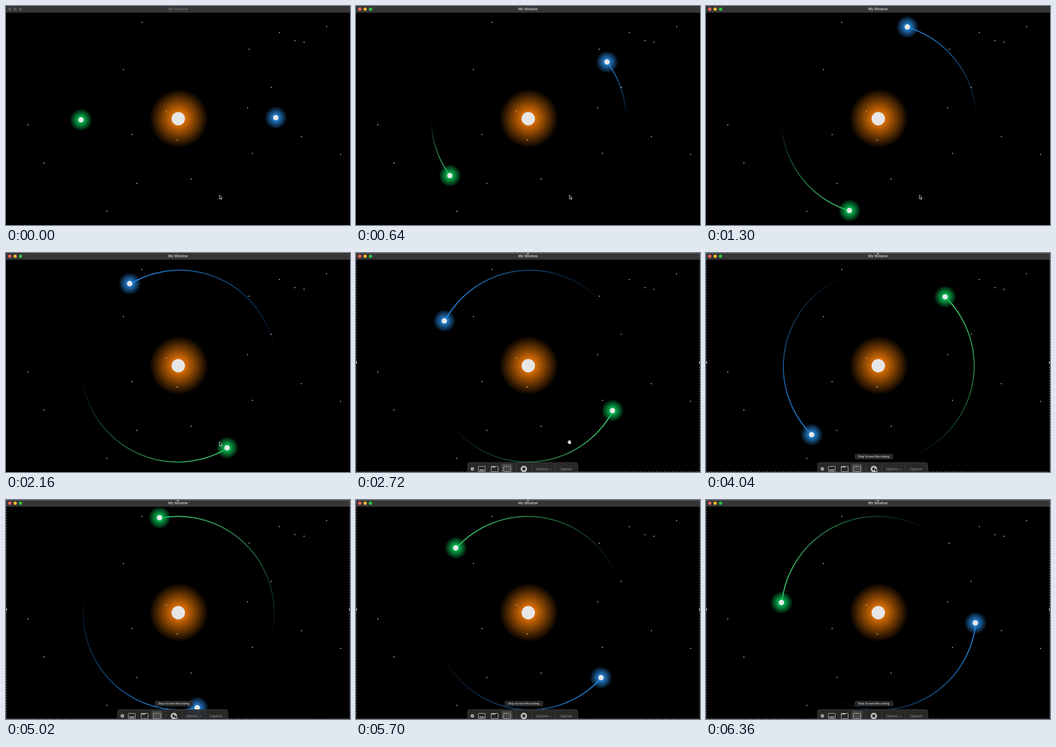
These frames come from a looping animation (640 by 408 pixels, 6.38 s). An HTML page with a canvas:

```html
<!DOCTYPE html>
<html lang="en">
<head>
<meta charset="utf-8">
<title>Two planets</title>
<style>
  html, body { margin: 0; width: 100%; height: 100%; overflow: hidden; background: #000; }
  canvas { display: block; }
</style>
</head>
<body>
<canvas id="stage" width="640" height="408"></canvas>
<script>
const ctx = document.getElementById('stage').getContext('2d');
const LOOP = 6380, FOCUS_AT = 200, TOOLBAR_AT = 2400, TIP_AT = 3600, CURSOR_OFF = 5500;
const ORBIT = { x: 322.3, y: 210.5, r: 179.4 };
const MID = { x: 320.4, y: 209.75 };
const TRAIL = 116;                      // longest trail, in degrees
const TRAIL_SHIFT = 1;                  // trails run slightly right of and below the planets
const BLUE = '38,136,222', GREEN = '8,196,86';
const ANGLES = [[0, .83], [1300, 73.1], [2160, 121], [2720, 151.9],
                [4040, 225.3], [5020, 280.6], [6380, 355.2]];
const STARS = [[252, 30], [596, 38], [508, 49], [537, 64], [554, 67], [452, 80], [218, 118],
               [493, 151], [449, 189], [298, 195], [40, 221], [234, 239], [549, 243], [318, 249],
               [458, 274], [622, 276], [70, 292], [344, 322], [243, 330], [187, 382]];

function circle(x, y, r, fill) {
  ctx.fillStyle = fill;
  ctx.beginPath();
  ctx.arc(x, y, r, 0, 7);
  ctx.fill();
}

function box(x, y, w, h, r, fill, stroke) {
  ctx.beginPath();
  ctx.roundRect(x, y, w, h, r);
  if (fill) { ctx.fillStyle = fill; ctx.fill(); }
  if (stroke) { ctx.strokeStyle = stroke; ctx.lineWidth = 1; ctx.stroke(); }
}

function label(text, x, y, size, weight, fill, align = 'center') {
  ctx.font = `${weight} ${size}px Inter, "Open Sans", sans-serif`;
  ctx.textAlign = align;
  ctx.textBaseline = 'middle';
  ctx.fillStyle = fill;
  ctx.fillText(text, x, y);
}

function line(points, stroke, width = 1) {
  ctx.beginPath();
  points.forEach(([x, y]) => ctx.lineTo(x, y));
  ctx.strokeStyle = stroke;
  ctx.lineWidth = width;
  ctx.stroke();
}

function star(x, y, fill) {
  ctx.fillStyle = fill;
  ctx.fillRect(x - .3, y - .3, 1.6, 1.6);
}

function glow(x, y, r, rgb, edge) {
  const g = ctx.createRadialGradient(x, y, 0, x, y, r);
  g.addColorStop(0, `rgba(${rgb},1)`);
  g.addColorStop(.25, `rgba(${rgb},.92)`);
  g.addColorStop(1, `rgba(${rgb},${edge})`);
  circle(x, y, r, g);
}

function angleAt(t) {
  const i = ANGLES.findIndex(([end]) => end > t);
  const [t0, a0] = ANGLES[i - 1], [t1, a1] = ANGLES[i];
  return a0 + (a1 - a0) * (t - t0) / (t1 - t0);
}

// The green planet mirrors the blue one through the middle.
function place(deg, mirror) {
  const a = deg * Math.PI / 180;
  const x = ORBIT.x + ORBIT.r * Math.cos(a), y = ORBIT.y - ORBIT.r * Math.sin(a);
  return mirror ? [2 * MID.x - x, 2 * MID.y - y] : [x, y];
}

function trail(head, mirror, rgb) {
  const tail = Math.max(ANGLES[0][1], head - TRAIL), n = 80;
  const at = k => place(tail + (head - tail) * k / n, mirror).map(v => v + TRAIL_SHIFT);
  for (let i = 0; i < n; i++) line([at(i), at(i + 1)], `rgba(${rgb},${i / n})`, 2);
}

function planet(head, mirror, rgb) {
  const [x, y] = place(head, mirror);
  glow(x + .5, y + .3, 20, rgb, .08);
  circle(x + .3, y + .3, 5, '#e6e8e8');
}

function titleBar(active) {
  ctx.fillStyle = '#373637';
  ctx.fillRect(0, 0, 640, 12.5);
  const lights = active ? ['#fe5f57', '#febc2e', '#28c840'] : ['#555', '#555', '#555'];
  lights.forEach((c, i) => circle(7 + 10 * i, 6, 3, c));
  label('My Window', 320, 6.2, 6.3, 600, active ? '#c8c8c8' : '#6c6c6c');
}

function selection() {
  ctx.setLineDash([2.5, 2.5]);
  ctx.strokeStyle = '#777';
  ctx.lineWidth = 1;
  ctx.strokeRect(.5, .5, 639, 407);
  ctx.setLineDash([]);
  [[320, 0], [0, 204], [640, 204]].forEach(([x, y]) => circle(x, y, 2.2, '#aaa'));
}

function toolbar() {
  const ink = '#b4b4b4';
  box(207.5, 390.5, 205, 30, 4, 'rgba(46,46,47,.88)', '#3c3c3c');
  circle(216.5, 402.3, 3.2, ink);
  line([[215.3, 401.1], [217.7, 403.5]], '#2a2a2a', .8);
  line([[217.7, 401.1], [215.3, 403.5]], '#2a2a2a', .8);
  box(227.5, 397.5, 13, 10, 1, null, ink);
  box(229.5, 403.5, 9, 2, 0, ink);
  box(251.5, 397.5, 13, 10, 1, null, ink);
  box(251.5, 397.5, 8, 2, 0, ink);
  box(271, 393, 20, 18, 2, '#474747');
  ctx.setLineDash([2, 1.5]);
  box(274.5, 397.5, 13, 10, 1, null, '#ddd');
  ctx.setLineDash([]);
  [297.5, 327.5, 370.5].forEach(x => line([[x, 393], [x, 408]], '#3e3e3e'));
  circle(312.3, 402.3, 6, '#bcbcbc');
  box(309.8, 399.8, 5, 5, .8, '#2b2b2b');
  label('Options', 335, 403, 6.2, 400, '#949494', 'left');
  line([[360.5, 402.2], [362.3, 404], [364.1, 402.2]], '#949494', .8);
  label('Capture', 379, 403, 6.2, 400, '#949494', 'left');
}

function tooltip() {
  box(277.5, 375, 70, 8.5, 1.5, '#262728', '#3c3c3c');
  label('Stop Screen Recording', 312, 379.3, 5.35, 500, '#dedede');
}

function arrow(x, y) {
  ctx.beginPath();
  [[0, 0], [0, 7.6], [1.7, 6.1], [2.9, 8.7], [4.1, 8.1], [2.9, 5.6], [5.2, 5.4]]
    .forEach(([dx, dy]) => ctx.lineTo(x + dx, y + dy));
  ctx.closePath();
  ctx.fillStyle = '#000';
  ctx.fill();
  ctx.strokeStyle = '#ddd';
  ctx.lineWidth = .9;
  ctx.stroke();
}

function hand(x, y) {
  box(x - 2, y - 1, 5, 5, 2, '#eee');
  [-1.6, 0, 1.6].forEach(d => line([[x + d + .4, y - 3], [x + d + .4, y + 1]], '#eee', 1.2));
  line([[x - 3.2, y - .5], [x - 1, y + 2]], '#eee', 1.3);
}

function cursor(t) {
  if (t > CURSOR_OFF) return;
  const k = Math.min(1, Math.max(0, (t - 2900) / 600));
  const s = k * k * (3 - 2 * k);
  const x = 397 - 83 * s, y = 352 + 48 * s;
  if (t >= TOOLBAR_AT && k < 1) hand(x, y);
  else arrow(x, y);
}

function draw(t) {
  const head = angleAt(t);
  ctx.fillStyle = '#000';
  ctx.fillRect(0, 0, 640, 408);
  trail(head, false, '38,140,232');
  trail(head, true, '66,214,120');
  STARS.forEach(([x, y]) => star(x, y, '#f4f4f4'));
  glow(321.5, 209.5, 54, '226,114,4', .02);
  star(298, 195, '#f0a04c');
  star(318, 249, '#f0a04c');
  circle(320.5, 210, 12.5, '#e6e6e6');
  planet(head, false, BLUE);
  planet(head, true, GREEN);
  titleBar(t >= FOCUS_AT);
  if (t >= TOOLBAR_AT) { selection(); toolbar(); }
  if (t >= TIP_AT) tooltip();
  cursor(t);
}

const start = performance.now();
function tick() {
  draw((performance.now() - start) % LOOP);
  requestAnimationFrame(tick);
}
tick();
</script>
</body>
</html>
```
